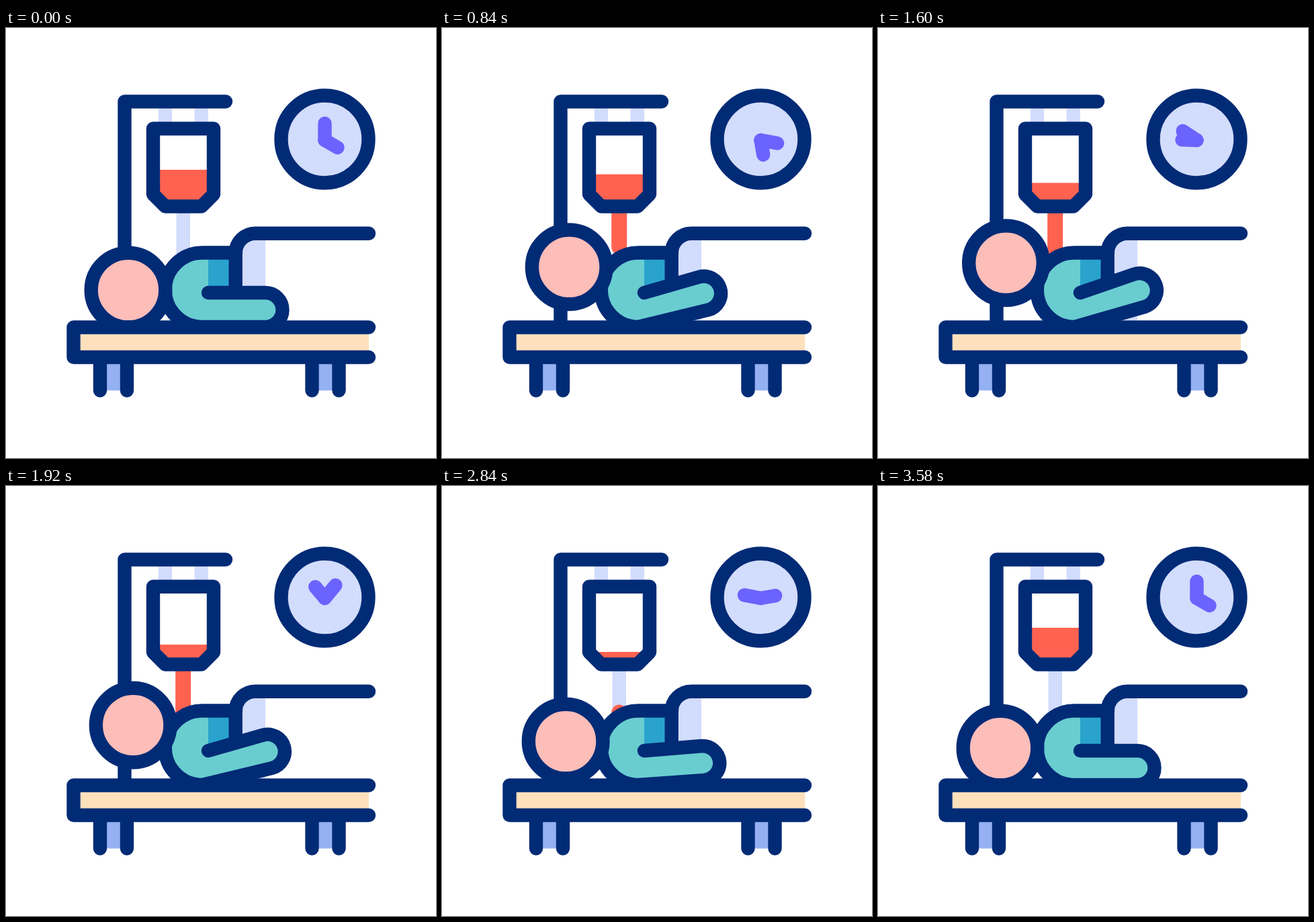
Recreate the animation shown at these times as an HTML page. Size 640 px wide and 640 px high, loop 3.6 s.

```html
<!DOCTYPE html>
<html lang="en">
<head>
<meta charset="utf-8">
<title>Patient on a drip</title>
<style>
  html, body { margin: 0; width: 100%; height: 100%; overflow: hidden; background: #fff; }
  svg { display: block; width: 100vw; height: 100vh; }
  .line { fill: none; stroke: #022b76; stroke-width: 20.4; stroke-linecap: round; stroke-linejoin: round; }
  .pale { fill: #d2dcfd; }
  .hand { stroke: #6b63fd; stroke-width: 20.4; stroke-linecap: round; }
</style>
</head>
<body>
<svg viewBox="0 0 640 640">
  <defs>
    <path id="bag" d="M219 149.700H309V247.500L291 265.500H237L219 247.500Z"/>
    <clipPath id="bagClip"><use href="#bag"/></clipPath>
  </defs>

  <!-- drip -->
  <path class="pale" d="M226.700 115H247V145H226.700ZM280.500 115H301V145H280.500ZM253.500 265H274V336H253.500Z"/>
  <line id="flow" x1="263.700" x2="263.700" stroke="#ff6250" stroke-width="23" stroke-linecap="round"/>
  <use href="#bag" fill="#fff"/>
  <rect id="level" x="219" width="90" height="60" fill="#ff6250" clip-path="url(#bagClip)"/>
  <use href="#bag" class="line"/>
  <path class="line" d="M176.500 445V109.500H327"/>

  <!-- clock -->
  <circle class="line" cx="474.500" cy="165.500" r="65" style="fill:#d2dcfd"/>
  <line id="hour" class="hand" x1="474.500" y1="167" x2="474.500" y2="145"/>
  <line id="minute" class="hand" x1="474.500" y1="167" x2="474.500" y2="142"/>

  <!-- body -->
  <rect class="pale" x="342" y="306" width="44" height="129"/>
  <path fill="#fff" d="M331 295H371A29.500 29.500 0 0 0 341.500 335H331Z"/>
  <rect x="301" y="335" width="41" height="59" fill="#29a3cd"/>
  <path class="line" d="M540 305.700H371A29.300 29.300 0 0 0 341.700 335V390"/>
  <path id="armFill" fill="#69cdd0"/>
  <path id="armLine" class="line"/>
  <circle id="head" class="line" cx="182" cy="390" r="55.300" style="fill:#fdbdb9"/>

  <!-- bed -->
  <path fill="#95b1f3" d="M140 490H180V539.500H140ZM455.500 490H495.500V539.500H455.500Z"/>
  <path fill="#fee0bd" d="M100 445.500H540V490H100Z"/>
  <path class="line" d="M540 445.500H100.500V490H540M140 490V539.500M180 490V539.500M455.500 490V539.500M495.500 490V539.500"/>
</svg>
<script>
  const LOOP = 3600, END = 3580;
  const el = id => document.getElementById(id);
  const [flow, level, hour, minute, armFill, armLine, head] =
    ['flow', 'level', 'hour', 'minute', 'armFill', 'armLine', 'head'].map(el);

  // smooth 0..1 between two times
  function ease(t, from, to) {
    const u = Math.min(1, Math.max(0, (t - from) / (to - from)));
    return u * u * (3 - 2 * u);
  }

  const spin = (hand, deg) => hand.setAttribute('transform', `rotate(${deg} 474.5 167)`);

  // point of the forearm after turning it about the elbow
  function turn(x, y, deg) {
    const a = deg * Math.PI / 180, c = Math.cos(a), s = Math.sin(a);
    const dx = x - 301, dy = y - 394;
    return `${(301 + dx * c - dy * s).toFixed(2)} ${(394 + dx * s + dy * c).toFixed(2)}`;
  }

  function draw(t) {
    const day = ease(t, 0, END);
    spin(hour, 120 + 360 * day);
    spin(minute, 720 * day);

    const lift = ease(t, 0, 1200) - ease(t, 1200, END);
    head.setAttribute('transform', `translate(${9.2 * lift} ${-43.6 * lift})`);

    const deg = -20.5 * lift;
    const arm = `H292A55.25 55.25 0 0 0 292 445L${turn(386, 445, deg)}` +
      `A25.500 25.500 0 0 0 ${turn(386, 394, deg)}L301 394`;
    armFill.setAttribute('d', `M301 334.5${arm}Z`);
    armLine.setAttribute('d', `M342 334.5${arm}`);

    const drained = ease(t, 0, 3060) - ease(t, 3060, END);
    level.setAttribute('y', 211 + 36.5 * drained);

    const tail = ease(t, 2400, 2940), tip = ease(t, 0, 1200);
    flow.setAttribute('y1', 255 + 90 * tail);
    flow.setAttribute('y2', 255 + 90 * tip);
    flow.style.display = tip > tail ? '' : 'none';
  }

  function tick(now) {
    draw(now % LOOP);
    requestAnimationFrame(tick);
  }
  draw(0);
  requestAnimationFrame(tick);
</script>
</body>
</html>
```
